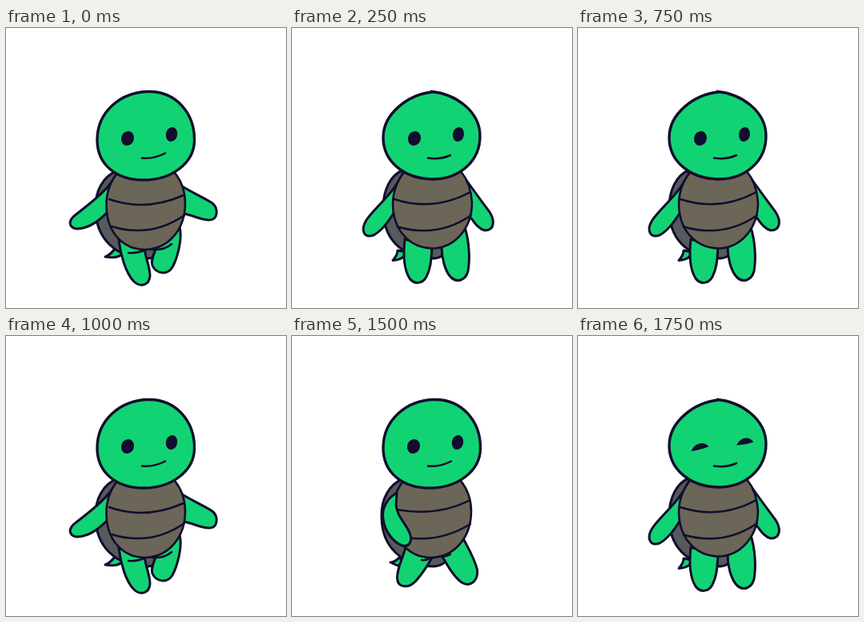
These frames come from a looping animation (350x350 px, 2000 ms). An HTML page:

```html
<!DOCTYPE html>
<html lang="en">
<head>
<meta charset="utf-8">
<title>Walking turtle</title>
<style>
  html, body { margin: 0; width: 100%; height: 100%; overflow: hidden; background: #fff; }
  svg { display: block; width: 100vw; height: 100vh; }
  path { stroke: #120d2e; stroke-width: 3; stroke-linecap: round; stroke-linejoin: round; }
  .skin { fill: #12d373; }
  .shell { fill: #555a5a; }
  .belly { fill: #6b6657; stroke-width: 2.6; }
  .line { fill: none; stroke-width: 2.5; }
  .ink { fill: #120d2e; stroke: none; }
  .head { stroke-width: 3.4; }
</style>
</head>
<body>
<svg id="stage" viewBox="0 0 350 350"></svg>
<script>
const STEP = 250;

// An upright egg-shaped eye, leaning slightly to the right
const eye = (x, y, rx, ry) =>
  `M${x - rx} ${y + 1}C${x - rx} ${y - ry * .6} ${x - rx * .4} ${y - ry} ${x + 1} ${y - ry}` +
  `C${x + rx * .7} ${y - ry} ${x + rx} ${y - ry * .5} ${x + rx} ${y - 1}` +
  `C${x + rx} ${y + ry * .6} ${x + rx * .4} ${y + ry} ${x - 1} ${y + ry}` +
  `C${x - rx * .7} ${y + ry} ${x - rx} ${y + ry * .5} ${x - rx} ${y + 1}Z`;

const turned = {
  head: 'M178 79.5C212 79 236 106 235.5 141C235 169 207 190 172 190C137 190 114 170 114 140C114 105 143 80 178 79.5Z',
  eyes: eye(152, 138, 8, 9) + eye(207, 133, 7.2, 9),
  mouth: 'M170 162.5Q185 164 199 156.5',
  shell: 'M138 179C122 185 111 204 112 226C112 262 136 288 178 288C188 287 195 281 197 271Z',
  belly: 'M142 178C131 190 125 205 125.5 223C126 256 147 277 174 277C204 276 224 251 224 219C224 203 219 191 211 181Z',
};

const stride = {
  ...turned,
  stripes: 'M129 214Q174 230 222 209M132 248Q181 263 223 234',
  tail: 'M124 286C130 284 133 280 136 276L146 282C139 288 131 287 124 286Z',
  legs: [
    'M217 249C221 263 214 288 208 299C202 309 188 308 183 297C180 289 187 280 189 270Z',
    'M141 265C143 282 149 306 160 317C169 325 179 321 180 310C180 298 174 287 173 275Z',
  ],
  folds: 'M153 281Q164 282 175 277M183 277Q198 278 207 270',
  arms: [
    'M138 183C127 205 97 225 84 236C77 243 80 251 90 251C106 250 118 239 128 229Z',
    'M217 196C233 206 249 213 258 219C266 226 265 240 254 240C243 240 234 234 222 232Z',
  ],
};

const cross = {
  ...turned,
  stripes: 'M131 217Q180 226 221 206M144 252Q186 258 223 235',
  tail: 'M123 283C129 283 132 279 135 276L138 285L132 287Z',
  legs: [
    'M142 264C139 277 131 290 131.5 303C132 315 146 316 155 306C162 298 169 288 175 277Z',
    'M187 274C194 286 202 301 212 308C224 315 233 305 231.5 292C228 277 220 265 213 251Z',
  ],
  folds: 'M162 280Q168 281 174 277M187 276Q193 276 198 273',
  arms: [],
  frontArm: 'M131 196C117 204 112 217 114 229C116 245 127 258 138 262C147 264 151 256 147 246C142 234 131 225 130 211Z',
};

const stand = {
  head: 'M174 79.5C204 82 235 104 235 135C235 167 209 189 175 189C140 188 114 167 114 137C114 107 145 83 176 80Z',
  eyes: eye(153, 138, 8, 9) + eye(208, 133, 7, 9),
  mouth: 'M170 162.5Q185 165 198 159',
  shell: 'M138 178C123 184 114 203 114 224C113 262 135 287 178 288C188 287 194 281 196 271Z',
  belly: 'M143 177C132 189 126 205 126 221C127 254 148 275 175 275.5C204 275 225 250 225 218C224 203 219 189 211 179Z',
  stripes: 'M128 214Q177 230 223 205M132 248.500Q182 263 224 234',
  tail: 'M126 290.5C130 286 132 282 132 278L143 280C141 288 133 290 126 290.5Z',
  legs: [
    'M141 264C139 282 140 302 147 313C153 321 163 320 168 311C174 300 174 287 175 274Z',
    'M187 273C187 287 191 304 199 312C207 319 217 315 220 304C223 287 221 265 216 249Z',
  ],
  folds: '',
  arms: [
    'M139 181C127 207 104 224 93 240C85 253 90 263 102 259C113 253 121 241 128 230Z',
    'M215 186C229 206 239 219 247 230C254 241 253 253 241 253C232 251 227 241 221 234Z',
  ],
};

const blink = {
  ...stand,
  eyes: 'M141.5 144C145 135 156 130 163.5 138Q154 142 141.5 144Z' +
        'M198 136.5C203 127 213 124 219.500 132.500Q210 136 198 136.5Z',
};

const walk = [stride, stand, cross, stand, stride, stand, cross, blink];
const stage = document.getElementById('stage');
const shape = (kind, d) => d ? `<path class="${kind}" d="${d}"/>` : '';
const skin = d => shape('skin', d);

function draw(pose) {
  stage.innerHTML = [
    skin(pose.tail),
    shape('shell', pose.shell),
    ...pose.legs.map(skin),
    shape('line', pose.folds),
    ...pose.arms.map(skin),
    shape('belly', pose.belly),
    shape('line', pose.stripes),
    skin(pose.frontArm),
    shape('skin head', pose.head),
    shape('ink', pose.eyes),
    shape('line', pose.mouth),
  ].join('');
}

const start = performance.now();
let shown;

function tick(now) {
  const elapsed = Math.max(0, now - start);
  const pose = walk[Math.floor(elapsed / STEP) % walk.length];
  if (pose !== shown) draw(shown = pose);
  requestAnimationFrame(tick);
}
tick(start);
</script>
</body>
</html>
```
